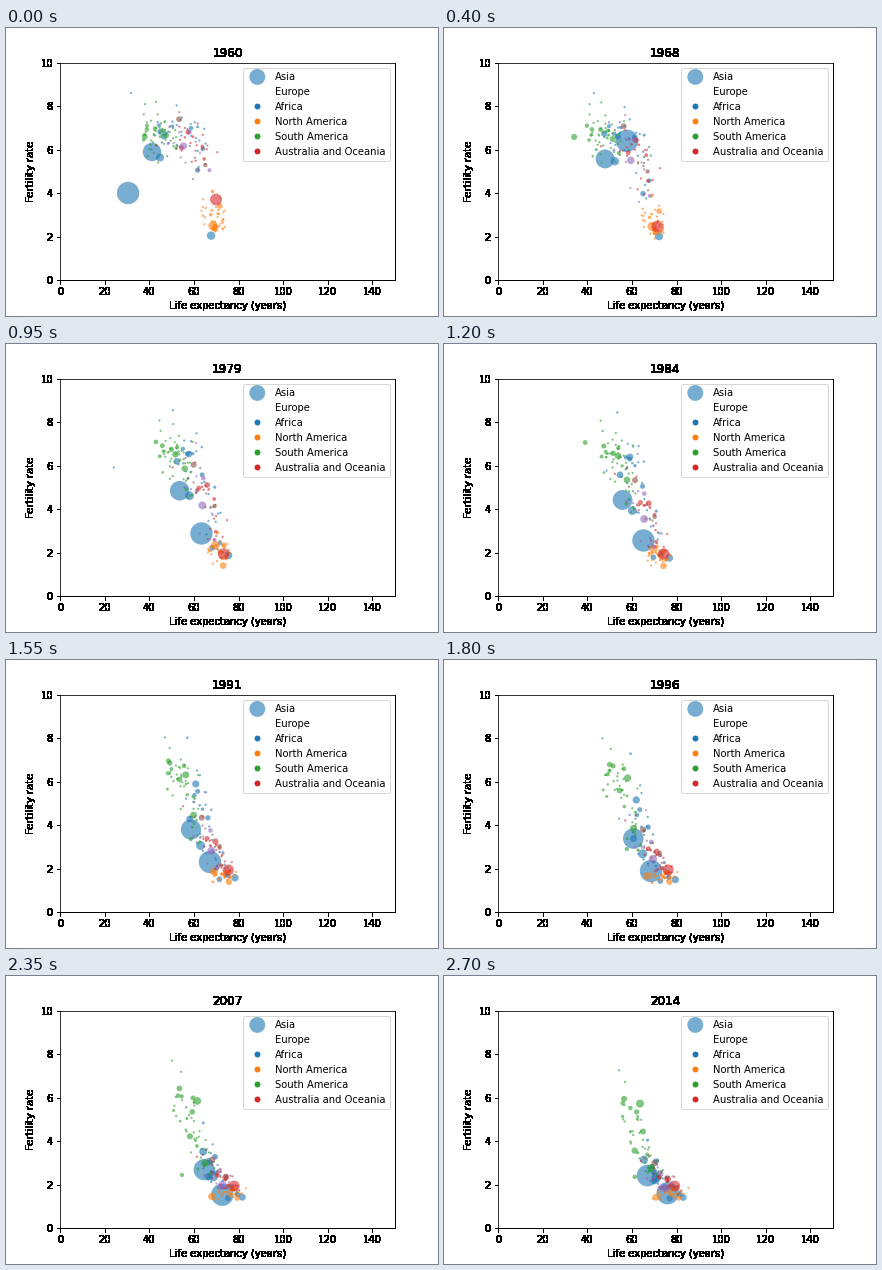
Animation of 432x288 px, one loop 2750 ms. Source, as a matplotlib script:

```python
import numpy as np
import matplotlib.pyplot as plt
from matplotlib.animation import FuncAnimation
from matplotlib.lines import Line2D

YEARS = np.arange(1960, 2015)
ELAPSED = (YEARS - 1960) / 54
ASIA, EUROPE, AFRICA, NORTH, SOUTH, OCEANIA = (f"C{i}" for i in range(6))

rng = np.random.default_rng(12)
countries = []


def add(color, pop, life, fert, mid, width, bend=1, shock=None):
    """One country: pop and life give first and last values.

    Fertility falls from high to low along an S-curve around the year mid;
    shock = (year, years lost, spread) is a passing loss of life expectancy."""
    size = pop[0] * (pop[1] / pop[0]) ** ELAPSED
    lives = life[0] + (life[1] - life[0]) * ELAPSED ** bend
    if shock:
        year, lost, spread = shock
        lives = lives - lost * np.exp(-((YEARS - year) / spread) ** 2)
    ferts = fert[0] + (fert[1] - fert[0]) / (1 + np.exp((mid - YEARS) / width))
    countries.append((color, size, lives, ferts))


def crowd(color, n, life0, life1, high, low, mid, width, growth, bend=1, dip=0):
    """Small countries; pairs run from the least to the most developed."""
    def along(span, q, noise):
        return span[0] + (span[1] - span[0]) * q + noise * rng.normal()

    for q in (np.arange(n) + 0.5) / n:
        start = along(life0, q, 2.2)
        end = along(life1, q, 1.8)
        floor = along(low, q, 0.15)
        top = max(rng.normal(*high), floor + 0.7)
        pop = min(3 * np.exp(1.2 * rng.normal()), 45)
        add(color, (pop, pop * growth), (start, end), (top, floor),
            along(mid, q, 5), width, bend, (2001, dip * abs(rng.normal()), 9))


# China: famine, recovery, then a steep fall
turns = [1960, 1961, 1963, 1965, 1968, 1975, 1980, 1991, 2001, 2014]
countries.append((
    ASIA, 660 * (1370 / 660) ** ELAPSED,
    np.interp(YEARS, turns, [30.5, 33.5, 49.5, 54, 57.8, 60.9, 64, 67.2, 69.9, 76]),
    np.interp(YEARS, turns, [4, 3.3, 7.3, 6.1, 6.4, 3.58, 2.7, 2.3, 1.47, 1.6])))

# India, Indonesia, Japan, Pakistan, Bangladesh, Philippines, Yemen, Cambodia
add(ASIA, (450, 1290), (41.2, 67), (6.3, 2), 1987, 12, 0.7)
add(ASIA, (88, 255), (44.8, 70.9), (5.7, 2.3), 1983.5, 6, 0.65)
add(ASIA, (93, 127), (67.7, 83), (2.05, 1.4), 1985, 6, 0.65)
add(ASIA, (45, 185), (46.5, 65.4), (6.6, 3), 1998, 5, 0.5)
add(ASIA, (49, 159), (45, 70.5), (6.85, 2.1), 1990, 6, 1.2)
add(ASIA, (26, 100), (58.7, 70.8), (7.5, 2.8), 1983, 11, 0.85)
add(ASIA, (5, 26), (31.8, 67), (8.6, 3.7), 2001, 5, 0.6)
add(ASIA, (5.7, 15), (41, 68), (6, 2.6), 1997, 5, 1, (1977, 31, 5))
crowd(ASIA, 32, (44, 66), (67, 81), (6.7, 0.6), (2.6, 1.5), (2000, 1970), 6, 3, 0.8)

# Russia, Germany
add(EUROPE, (120, 143), (68.6, 71.2), (2.5, 1.4), 1989, 6, 1, (2001, 5, 8))
add(EUROPE, (73, 81), (69.4, 81), (2.4, 1.38), 1971, 2, 1.1)
crowd(EUROPE, 37, (66, 73), (73, 82), (2.9, 0.6), (1.4, 1.75), (1977, 1971), 5, 1.2, 1.3)

# Nigeria, Ethiopia, South Africa, Rwanda
add(AFRICA, (45, 176), (38, 63.6), (6.6, 5.6), 1998, 8, 0.6, (1968, 12, 2))
add(AFRICA, (22, 97), (39, 65), (7.1, 3.9), 2006, 5, 1.8, (1984, 6, 1.5))
add(AFRICA, (17, 54), (52, 63.5), (6.2, 2.3), 1984, 7, 0.9, (2005, 8, 8))
add(AFRICA, (2.9, 11), (43, 65), (8.2, 4), 1992, 5, 1, (1994, 44, 1.6))
crowd(AFRICA, 45, (37, 51), (56, 72), (6.8, 0.6), (4, 2.4), (2022, 1984), 8, 3.8, 0.9, 4)

# United States, Mexico, Haiti
add(NORTH, (186, 319), (69.9, 79.2), (3.9, 1.93), 1965.5, 2.5, 0.95)
add(NORTH, (38, 124), (57.4, 76), (7, 2.2), 1982, 7, 0.75)
add(NORTH, (3.9, 10.5), (43, 64), (6.2, 3), 1993, 6, 1, (2010, 30, 0.6))
crowd(NORTH, 18, (52, 67), (71, 80), (6.6, 0.6), (2.4, 1.7), (1988, 1968), 7, 2.4, 0.8)

# Brazil
add(SOUTH, (72, 204), (55.3, 74.8), (6.9, 1.7), 1978, 10, 0.8)
crowd(SOUTH, 11, (50, 66), (69, 78), (6.5, 0.6), (2.5, 1.9), (1988, 1969), 8, 2.4, 0.85)

crowd(OCEANIA, 10, (48, 68), (64, 80), (6.4, 0.6), (3.2, 1.9), (1994, 1968), 8, 2.4, 0.9)

colors = [c[0] for c in countries]
pops, lives, ferts = (np.array([c[k] for c in countries]) for k in (1, 2, 3))
sizes = np.maximum(500 * pops / pops.max(axis=0), 5)


def harden(img, dpi):
    """Turn soft edges into full black."""
    out = np.zeros_like(img)
    out[..., 3] = img[..., 3] > 0
    return out, 0, 0


def key(color):
    return Line2D([], [], color="white", marker="o", markerfacecolor=color, markersize=7)


fig = plt.figure(figsize=(6, 4), dpi=72, facecolor="white")
fig.subplots_adjust(left=0.125, right=0.9, bottom=0.125, top=0.88)
ax = fig.add_subplot()
ax.set(xlim=(0, 150), ylim=(0, 10), xticks=range(0, 150, 20), yticks=range(0, 11, 2),
       xlabel="Life expectancy (years)", ylabel="Fertility rate")
title = ax.set_title("1960")
dots = ax.scatter(lives[:, 0], ferts[:, 0], s=sizes[:, 0], c=colors, alpha=0.6, linewidths=0)

ax.legend([dots, key("white")] + [key(f"C{i}") for i in range(4)],
          ["Asia", "Europe", "Africa", "North America", "South America",
           "Australia and Oceania"], loc="upper right")

hard = [title, ax.xaxis.label, ax.yaxis.label, ax.spines["right"], ax.spines["bottom"]]
for axis in (ax.xaxis, ax.yaxis):
    for tick in axis.get_major_ticks():
        hard += [tick.label1, tick.tick1line]
for artist in hard:
    artist.set_agg_filter(harden)


def draw(i):
    dots.set_offsets(np.column_stack([lives[:, i], ferts[:, i]]))
    dots.set_sizes(sizes[:, i])
    title.set_text(str(YEARS[i]))
    return dots, title


anim = FuncAnimation(fig, draw, frames=len(YEARS), interval=50, repeat=True,
                     repeat_delay=0, blit=False)
plt.show()
```
